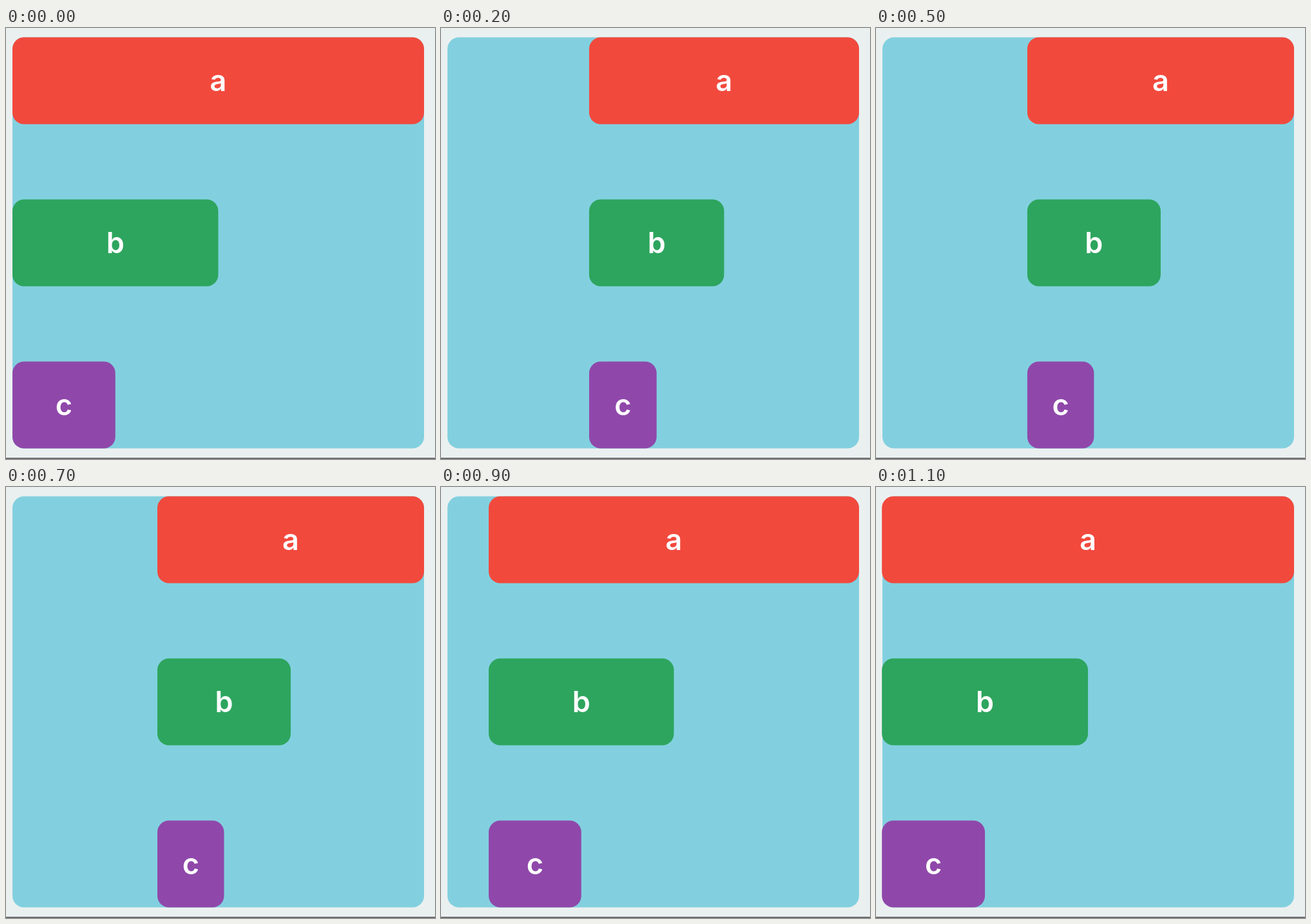
These frames come from a looping animation (666 px wide and 670 px high, 1200 ms). An HTML page with a canvas:

```html
<!DOCTYPE html>
<html lang="en">
<head>
<meta charset="utf-8">
<title>Spring bars</title>
<style>
  html, body { margin: 0; width: 100%; height: 100%; overflow: hidden; background: #eaf0f0; }
  canvas { display: block; }
</style>
</head>
<body>
<canvas id="stage" width="666" height="670"></canvas>
<script>
const ctx = document.getElementById('stage').getContext('2d');

const LOOP = 1200, TICK = 100;
const LEFT = 10, RIGHT = 649, TOP = 14.5, SIZE = 639;
const INDENT = 225, BAR = 135, GAP = 252, RADIUS = 18;
const OUT_AT = 80, BACK_AT = 823.5;
const BARS = [
  { label: 'a', color: '#f2493d', share: 1 },
  { label: 'b', color: '#2da55e', share: 1 / 2 },
  { label: 'c', color: '#8f48aa', share: 1 / 4 }
];

// Underdamped spring response from 0 to 1, time in ms.
function spring(ms) {
  if (ms <= 0) return 0;
  const zeta = 0.7, omega = 0.02575;
  const root = Math.sqrt(1 - zeta * zeta);
  const p = omega * ms, q = p * root;
  return 1 - Math.exp(-zeta * p) * (Math.cos(q) + zeta / root * Math.sin(q));
}

function panel(x, y, w, h, color) {
  ctx.fillStyle = color;
  ctx.beginPath();
  ctx.roundRect(x, y, w, h, RADIUS);
  ctx.fill();
}

function draw(t) {
  ctx.fillStyle = '#eaf0f0';
  ctx.fillRect(0, 0, 666, 670);
  ctx.fillStyle = '#6b6d70';
  ctx.fillRect(0, 668, 666, 2);
  panel(LEFT, TOP, SIZE, SIZE, '#82d0df');

  const x = LEFT + INDENT * (spring(t - OUT_AT) - spring(t - BACK_AT));
  ctx.font = '600 45px Inter, "Open Sans", sans-serif';
  ctx.textAlign = 'center';
  BARS.forEach((bar, i) => {
    const y = TOP + i * GAP, w = (RIGHT - x) * bar.share;
    panel(x, y, w, BAR, bar.color);
    ctx.fillStyle = '#fff';
    ctx.fillText(bar.label, x + w / 2, y + 83.5);
  });
}

let start;
function loop(now) {
  start ??= now;
  const t = (now - start) % LOOP;
  draw(Math.floor(t / TICK) * TICK);
  requestAnimationFrame(loop);
}
draw(0);
requestAnimationFrame(loop);
</script>
</body>
</html>
```
